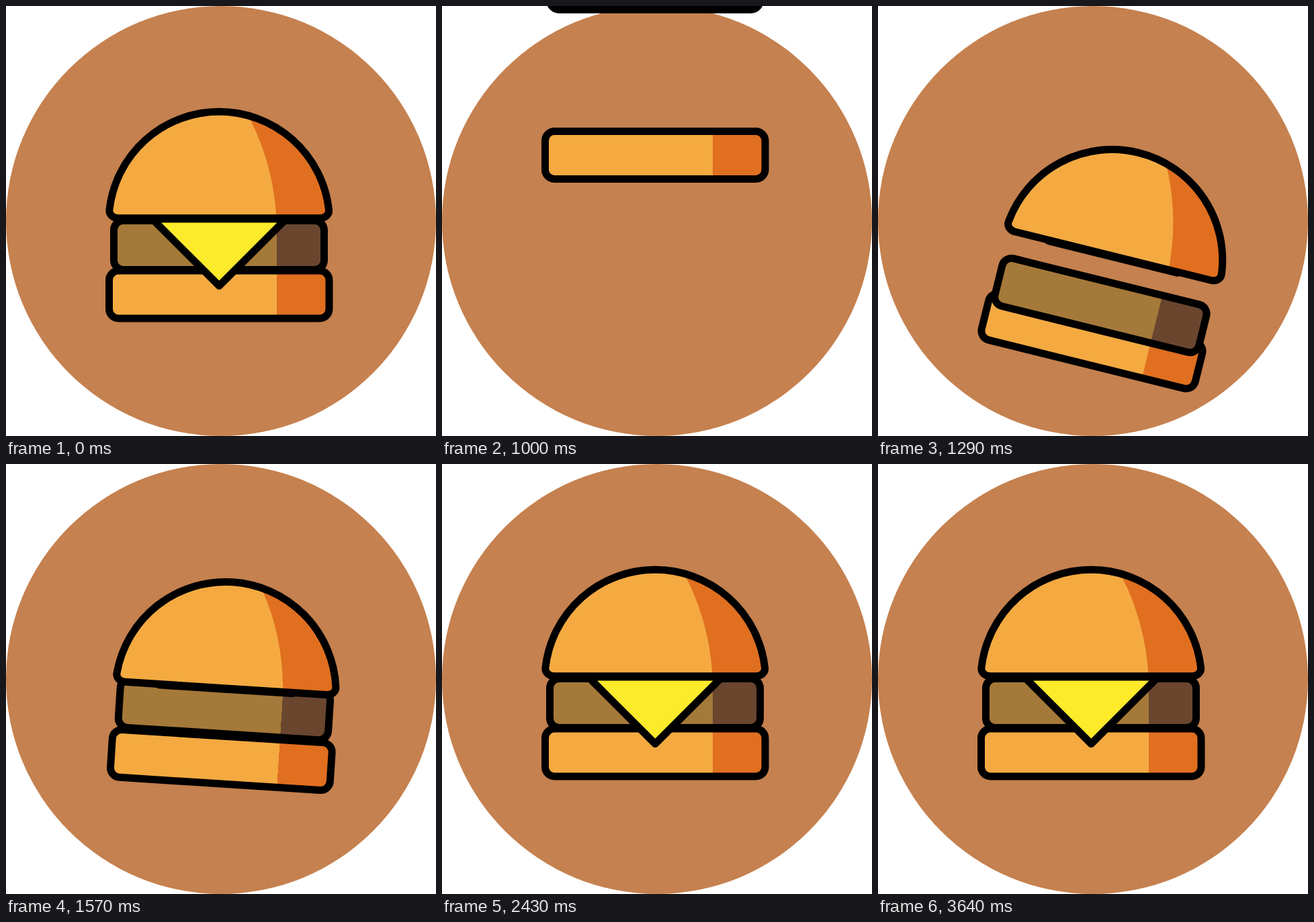
An HTML page for the animation above (3.78 s loop, 640x640 px).

```html
<!DOCTYPE html>
<html lang="en">
<head>
<meta charset="utf-8">
<title>Burger</title>
<style>
  html, body { margin: 0; width: 100%; height: 100%; overflow: hidden; background: #fff; }
  svg { display: block; width: 100%; height: 100%; }
  .line { stroke: #000; stroke-width: 11; stroke-linejoin: round; stroke-linecap: round; }
</style>
</head>
<body>
<svg viewBox="0 0 640 640">
  <defs>
    <linearGradient id="bread" gradientUnits="userSpaceOnUse" x1="0" x2="640" y1="0" y2="0">
      <stop offset=".629" stop-color="#f4aa41"/><stop offset=".629" stop-color="#e06f20"/>
    </linearGradient>
    <linearGradient id="meat" gradientUnits="userSpaceOnUse" x1="0" x2="640" y1="0" y2="0">
      <stop offset=".629" stop-color="#a57939"/><stop offset=".629" stop-color="#6a462f"/>
    </linearGradient>
  </defs>
  <circle cx="320" cy="320" r="320" fill="#c5814f"/>
  <g id="burger">
    <rect id="bun" class="line" x="153.5" y="394" width="327.5" height="71" rx="14" fill="url(#bread)"/>
    <rect id="patty" class="line" x="160.5" y="319.5" width="313" height="73" rx="14" fill="url(#meat)"/>
    <g id="top">
      <path id="cheese" class="line" fill="#fcea2b"/>
      <path fill="#f4aa41" d="M167 315.7C159 315.7 153 310 154 303A164.3 164.3 0 0 1 480.5 303C481.5 310 475.5 315.7 467.5 315.7Z"/>
      <path fill="#e06f20" d="M362 166Q398 235 402.5 316H467.5C475.5 316 481.5 310 480.5 303A164.3 164.3 0 0 0 362 166Z"/>
      <path class="line" fill="none" d="M167 315.7C159 315.7 153 310 154 303A164.3 164.3 0 0 1 480.5 303C481.5 310 475.5 315.7 467.5 315.7Z"/>
    </g>
  </g>
</svg>
<script>
const LOOP = 3780, FPS = 14;
const swing = p => (1 - Math.cos(Math.PI * p)) / 2;
const fall = p => p ** 1.43;
const brake = p => Math.sin(Math.PI * p / 2);

// Keys are [step, value, easing towards this key].
const tracks = {
  bun: [[10, -470], [16.01, 0, fall], [17.2, 37, brake], [19.6, 0]],
  patty: [[13.68, -400], [17.2, 0, fall], [18.2, 49, brake], [22, -2], [28, 0]],
  top: [[15.9, -360], [17.75, 0, fall], [18.6, 25, brake], [24.5, -4], [28, 0]],
  tilt: [[15, 0], [18.3, 14.2], [24.5, -2], [27.6, 0]],
  melt: [[25, 0], [33, 99.5]]
};

function valueAt(keys, step) {
  const i = keys.findIndex(key => key[0] > step);
  if (i < 0) return keys[keys.length - 1][1];
  if (i === 0) return keys[0][1];
  const [t0, v0] = keys[i - 1], [t1, v1, ease = swing] = keys[i];
  return v0 + (v1 - v0) * ease((step - t0) / (t1 - t0));
}

const el = id => document.getElementById(id);

function draw(ms) {
  const step = Math.floor((ms % LOOP + 5) * FPS / 1000);
  const leaving = step < 3;
  const pose = leaving ? 60 : step;
  const at = name => valueAt(tracks[name], pose);

  el("burger").setAttribute("opacity", leaving ? 1 - step / 3 : step < 10 ? 0 : 1);
  el("burger").setAttribute("transform", `rotate(${at("tilt")} 148 483)`);
  for (const id of ["bun", "patty", "top"])
    el(id).setAttribute("transform", `translate(0 ${at(id)})`);
  el("cheese").setAttribute("d", `M217.8 317H416.8L317.3 ${317 + at("melt")}Z`);
}

const start = performance.now();
function tick() {
  draw(performance.now() - start);
  requestAnimationFrame(tick);
}
tick();
</script>
</body>
</html>
```
